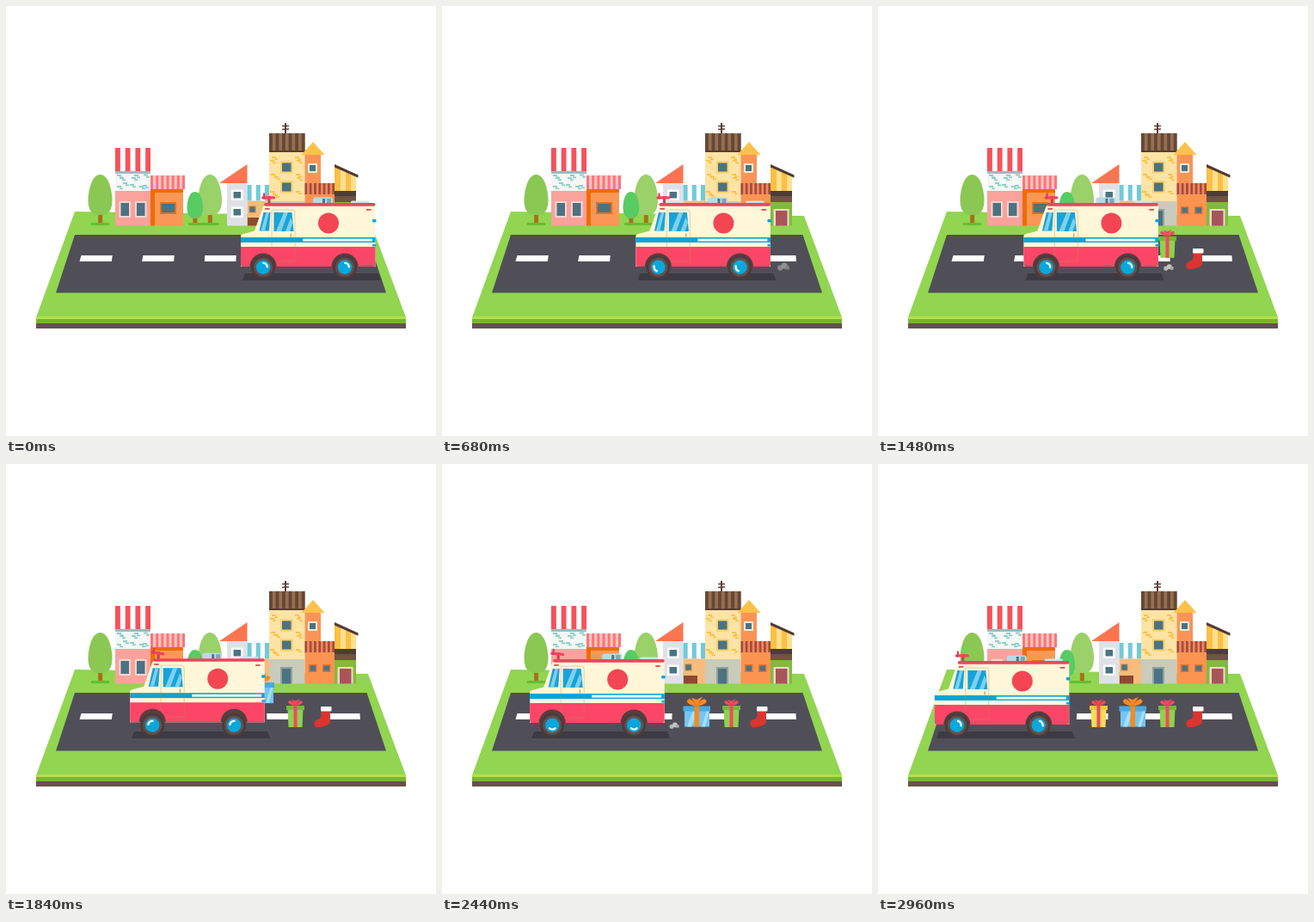
An HTML page for the animation above (3000 ms loop, 500x500 px).

```html
<!DOCTYPE html>
<html lang="en">
<head>
<meta charset="utf-8">
<title>Delivery van</title>
<style>
html, body { margin: 0; width: 100%; height: 100%; overflow: hidden; background: #fff; }
svg { display: block; width: 100%; height: 100%; }
</style>
</head>
<body>
<svg id="stage" viewBox="0 0 500 500"></svg>
<script>
const LOOP = 3000, STEP = 40, SPEED = 0.07;
const TEAL = '#4b7381';

const rect = (x, y, w, h, fill, extra = '') =>
  `<rect x="${x}" y="${y}" width="${w}" height="${h}" fill="${fill}" ${extra}/>`;
const poly = (points, fill) => `<polygon points="${points}" fill="${fill}"/>`;
const path = (d, fill, extra = '') => `<path d="${d}" fill="${fill}" ${extra}/>`;
const line = (d, stroke, width) => path(d, 'none', `stroke="${stroke}" stroke-width="${width}"`);
const circle = (x, y, r, fill) => `<circle cx="${x}" cy="${y}" r="${r}" fill="${fill}"/>`;
const group = (id, content) => `<g id="${id}">${content}</g>`;

function stripes(x, y, w, h, count, base, color) {
  const step = w / count;
  let out = rect(x, y, w, h, base);
  for (let i = 0; i < count; i += 2) out += rect(x + i * step, y, step, h, color);
  return out;
}

const pane = (x, y, w, h, frame, border = 2, glass = TEAL) =>
  rect(x, y, w, h, frame) + rect(x + border, y + border, w - 2 * border, h - 2 * border, glass);

function bricks(points, color) {
  return points.map(([x, y]) => rect(x, y, 5, 2, color) + rect(x + 3, y + 2.4, 4, 1.8, color)).join('');
}

function tree(x, top, half, bottom, color) {
  const mid = top + (bottom - top) * 0.62;
  return rect(x - half * 1.25 / 2 - 2, 252, half * 1.25 + 4, 3, '#62bd32', 'rx="1"') +
    rect(x - 2.4, bottom - 4, 5, 256 - bottom, '#a9701d') +
    path(`M${x} ${top}C${x + half * .75} ${top} ${x + half} ${mid - 8} ${x + half} ${mid}` +
      `C${x + half} ${bottom - 3} ${x + half * .55} ${bottom} ${x} ${bottom}` +
      `C${x - half * .55} ${bottom} ${x - half} ${bottom - 3} ${x - half} ${mid}` +
      `C${x - half} ${mid - 8} ${x - half * .75} ${top} ${x} ${top}Z`, color);
}

function ground() {
  let out = poly('80,239 421,244 465,362 35,362', '#92d551') +
    rect(35, 361, 430, 3.5, '#b3e04f') + rect(35, 364, 430, 5, '#77b72f') +
    rect(35, 369, 430, 6, '#66524a') +
    poly('80,266 419.5,266 442,333.5 58,333.5', '#504f58');
  for (let i = 0; i < 5; i++) {
    const x = 87.5 + 71.9 * i, slant = 2 - i * 0.75;
    out += poly(`${x},290 ${x + 36.3},290 ${x + 36.3 - slant * .5},297 ${x - slant},297`, '#fff');
  }
  return out;
}

function leftHouses() {
  const teal = '#8fd0c6';
  return stripes(127, 165, 41, 27, 7, '#fff', '#f6525b') +
    rect(127, 192, 41, 3, '#9fb9bd') + rect(127, 195, 41, 20, '#f3f7f6') +
    bricks([[129, 196], [149, 196], [160, 195.5], [132, 199], [146, 199], [136, 205],
      [129, 209], [144, 207], [155, 209], [159, 208]], teal) +
    rect(127, 215, 41, 40.5, '#f9a29c') +
    pane(131.5, 227, 13.5, 19, '#f6d5d0') + pane(150, 227, 13.5, 19, '#f6d5d0') +
    stripes(168, 197, 40, 16, 13, '#ffc5c4', '#fb7579') +
    rect(168, 213, 38, 42.5, '#fb9856') + rect(168, 213, 38, 4, '#ef6c00') +
    rect(168, 213, 5, 42.5, '#ef6c00') +
    pane(179, 228, 19, 14, '#e3721a');
}

function middleHouses() {
  return poly('248,206 280.5,184 280.5,206', '#fb7550') +
    rect(257, 206, 23.5, 49.5, '#dfe1e7') +
    pane(262, 213.5, 13.5, 12.5, '#fff', 2.5) + pane(262, 233.5, 13.5, 12.5, '#fff', 2.5) +
    stripes(280.5, 208, 25.5, 18.5, 5, '#fff', '#70cbd9') +
    rect(280.5, 226.5, 25.5, 29, '#f5bc7c') +
    pane(282, 232, 9, 9, '#e3a15c', 1.3) +
    rect(281, 246, 16, 9.5, '#8d4a31');
}

function tower() {
  const gold = '#fbc24f';
  return rect(324, 136, 2, 12, '#5b4036') +
    line('M321 139.5H329M321 143.5L329 143', '#5b4036', 1.6) +
    stripes(306, 148, 41.5, 21.5, 11, '#94704f', '#664737') +
    rect(306, 168, 41.5, 2, '#593d31') + rect(306, 170, 41.5, 57, '#fde4a5') +
    bricks([[309, 175], [336, 175], [307, 179], [338, 179], [308, 195], [337, 195],
      [312, 198], [338, 199], [307, 215], [337, 215], [311, 219]], gold) +
    pane(319, 180.5, 14.5, 14, '#f9d06b') + pane(319, 203.5, 14.5, 14, '#f9d06b') +
    rect(306, 227, 41.5, 28.5, '#c9cbbb') +
    rect(319, 236, 14, 19.5, '#91a29e') + rect(321, 238, 10, 17.5, TEAL);
}

function rightHouses() {
  return rect(347.5, 173, 18.5, 33, '#fa9456') +
    poly('343.5,173 357,158 370.5,173', '#fbc24b') +
    pane(351, 183, 11, 11, '#fde9dc') +
    stripes(347.5, 206, 34.5, 14, 13, '#f28a58', '#a24a42') +
    rect(347.5, 219, 34.5, 36.5, '#fb9450') +
    pane(352, 233, 9.5, 9, '#d9743b', 1.5) + pane(368, 233, 9.5, 9, '#d9743b', 1.5) +
    poly('382,186 407,198 407,215 382,215', '#fde08e') +
    poly('382,186 389,189.4 389,215 382,215', '#fbbf45') +
    poly('395,192.2 401,195 401,215 395,215', '#fbbf45') +
    poly('382,184 409.5,196.5 409.5,199.8 382,187.5', '#513a35') +
    rect(382, 215, 25, 6.5, '#4e3c39') + rect(382, 221, 25, 7.5, '#705342') +
    rect(382, 228, 25, 27.5, '#82ba3c') +
    rect(385.5, 236, 18, 19.5, '#eadccb') + rect(388, 238, 13.5, 17.5, '#a8555a');
}

function bow(x, y, size, color) {
  return path(`M${x} ${y}q${-size * .9} ${-size * .1} ${-size} ${-size * .5}q${size * .3} ${-size * .6} ${size} ${size * .5}` +
    `q${size * .7} ${-size * 1.1} ${size} ${-size * .5}q${-size * .1} ${size * .4} ${-size} ${size * .5}Z`, color) +
    path(`M${x} ${y}l${-size * .55} ${-size * .85}l${size * .55} ${size * .2}l${size * .6} ${-size * .3}Z`, color);
}

function smallGift(x, body, lid, ribbon) {
  return poly(`${x - 9},284 ${x + 9},284 ${x + 8},306 ${x - 8},306`, body) +
    rect(x - 10.5, 281, 21, 5, lid) + rect(x - 2, 281, 4, 25, ribbon) +
    bow(x, 281, 8.5, ribbon);
}

const stocking = () =>
  path('M366.5 286H377V300Q376 303 371 304.5Q366 306.5 361 306Q357.500 304.500 358.500 300.500Q360 297 364 296.500Q366.500 295 366.500 291Z', '#dc3430') +
  rect(366, 282, 12.5, 5.5, '#fff', 'rx="1"');

const bigGift = () =>
  rect(282, 284, 29, 21.5, '#74c6f2') + poly('285,305.5 292,286 297,286 290,305.5', '#a8def8') +
  poly('302,305.5 308,286 311,286 306,305.5', '#a8def8') +
  rect(280.5, 281.5, 31.5, 6, '#4ba9de') + rect(293.5, 281.5, 5.5, 24, '#f68b1f') +
  bow(296.2, 281.5, 11.5, '#f68b1f');

const gifts = [
  { id: 'stocking', x: 368, start: 850, draw: stocking },
  { id: 'green', x: 336.5, start: 1243, draw: () => smallGift(336.5, '#8fd14f', '#73b83b', '#f2495d') },
  { id: 'blue', x: 296, start: 1700, draw: bigGift },
  { id: 'yellow', x: 256.5, start: 2430, draw: () => smallGift(256.5, '#fddc55', '#f6c53b', '#ee4b54') }
];

function vanBody() {
  return rect(84, 222.5, 23, 7.5, '#b4dce8', 'rx="3"') + rect(95, 224, 3, 5, '#55727c') +
    rect(100, 224, 5, 5, '#7fa6b1') + rect(128, 226.5, 21, 4, '#c4e7ee', 'rx="1.5"') +
    path('M0 303V267Q1 265 5 264.500L16 261.500L25 236Q26 231 31 231H154Q156.500 231 156.500 234V303Z', '#fff7d8') +
    rect(27, 229, 129.5, 3.7, '#eb465f', 'rx="1.800"') +
    rect(0, 269, 156.5, 6, '#08a4d8') + rect(72, 270.6, 81, 3, '#e9f8fc') +
    path('M0 280H156.500V301Q156.500 303 154.500 303H2Q0 303 0 301Z', '#fb4667') +
    poly('21.500,261.500 26.500,240 34.500,240 33,261.500', '#16a3da') +
    poly('23.500,261 29.500,240 33,240 28,261', '#7fd0ef') +
    poly('38.500,240 59.500,240 61.500,262 38.500,262', '#16a3da') +
    poly('41,262 50,240 55,240 47,262', '#7fd0ef') + poly('52,262 58,246 60.500,252 57,262', '#7fd0ef') +
    path('M36 297V237H60Q63 237 63 241V297Z', 'none', 'stroke="#b88d58" stroke-opacity=".55" stroke-width=".7"') +
    rect(57.5, 264.5, 1.5, 4, '#b9a789') +
    rect(28, 235, 5.5, 1.8, '#eb465f') + rect(146, 236, 5.5, 1.8, '#eb465f') +
    rect(153, 248, 4.5, 3.5, '#08a4d8', 'rx="1"') + rect(153, 277, 4.5, 2.5, '#08a4d8', 'rx="1"') +
    circle(102, 252.5, 12, '#f34653') +
    [26, 121].map(x => path(`M${x - 15.5} 303A15.500 15.500 0 0 1 ${x + 15.5} 303Z`, '#573f3e')).join('');
}

const wheel = x => circle(x, 303.7, 14, '#4b3c3d') + circle(x, 303.7, 11, '#65504d') +
  circle(x, 303.7, 8.2, '#08a7dc') +
  `<g class="glint" data-x="${x}">` +
  path(`M${x + 3.6} 300.500A4.800 4.800 0 0 1 ${x + 3.6} 306.900`, 'none',
    'stroke="#fff" stroke-width="2.400" stroke-linecap="round"') + '</g>';

const antenna = () => rect(31.5, 221, 3, 10, '#c73c55') +
  group('vane', rect(24, 221.3, 16, 3.2, '#ee4560', 'rx="1.500"') + rect(26, 217.5, 2.2, 7, '#d6415a'));

const puff = () => group('puff', circle(-3, 1, 2.7, '#b9b9b4') + circle(1, -1, 3, '#c5c5c0') + circle(4, .8, 2.2, '#aaaaa6'));

const stage = document.getElementById('stage');
stage.innerHTML = ground() +
  tree(109.5, 196, 14, 243, '#8bc753') + tree(237.2, 196, 13.8, 243, '#9ad169') +
  tree(219.8, 216, 9.3, 247, '#57cc63') +
  leftHouses() + middleHouses() + tower() + rightHouses() +
  gifts.map(g => group(g.id, g.draw())).join('') +
  group('van', poly('5,311 160,311 163,319 2,319', '#3c3b43') + puff() +
    group('body', antenna() + vanBody()) + wheel(26) + wheel(121));

const el = id => document.getElementById(id);
const glints = [...document.querySelectorAll('.glint')];
const place = (node, transform) => node.setAttribute('transform', transform);

// Drop from behind the van, one small rebound, brief squash on landing.
function updateGift({ id, x, start }, t) {
  const FALL = 300, REBOUND = 200, age = t - start;
  const node = el(id);
  node.setAttribute('visibility', age > 0 ? 'visible' : 'hidden');
  if (age <= 0) return;
  let y = 0;
  if (age < FALL) y = -35 * (1 - (age / FALL) ** 2);
  else if (age < FALL + REBOUND) {
    const u = (age - FALL) / REBOUND;
    y = -24 * u * (1 - u);
  }
  const grow = Math.min(1, age / 100);
  const squash = 0.18 * Math.max(0, 1 - Math.abs(age - FALL) / 50);
  place(node, `translate(${x} ${306 + y}) scale(${grow * (1 + squash)} ${grow * (1 - squash)}) translate(${-x} -306)`);
}

function update(time) {
  const t = Math.floor(time % LOOP / STEP) * STEP;
  const lift = 3 * Math.max(0, Math.sin(Math.PI * Math.min(1, Math.max(0, (t % 750 - 100) / 400))));
  place(el('van'), `translate(${273 - SPEED * t} 0)`);
  place(el('body'), `translate(0 ${-lift})`);
  place(el('vane'), `rotate(${lift * 3} 33 223)`);
  for (const g of glints) place(g, `rotate(${-45 - 0.24 * t} ${g.dataset.x} 303.7)`);

  const age = t % 1000;
  place(el('puff'), `translate(${161 + age / 65} ${306 - age / 250}) scale(${0.55 + age / 1100})`);
  el('puff').setAttribute('opacity', Math.min(1, age / 40, Math.max(0, (820 - age) / 250)));
  gifts.forEach(g => updateGift(g, t));
}

const begin = performance.now();
function tick() {
  update(performance.now() - begin);
  requestAnimationFrame(tick);
}
tick();
</script>
</body>
</html>
```
